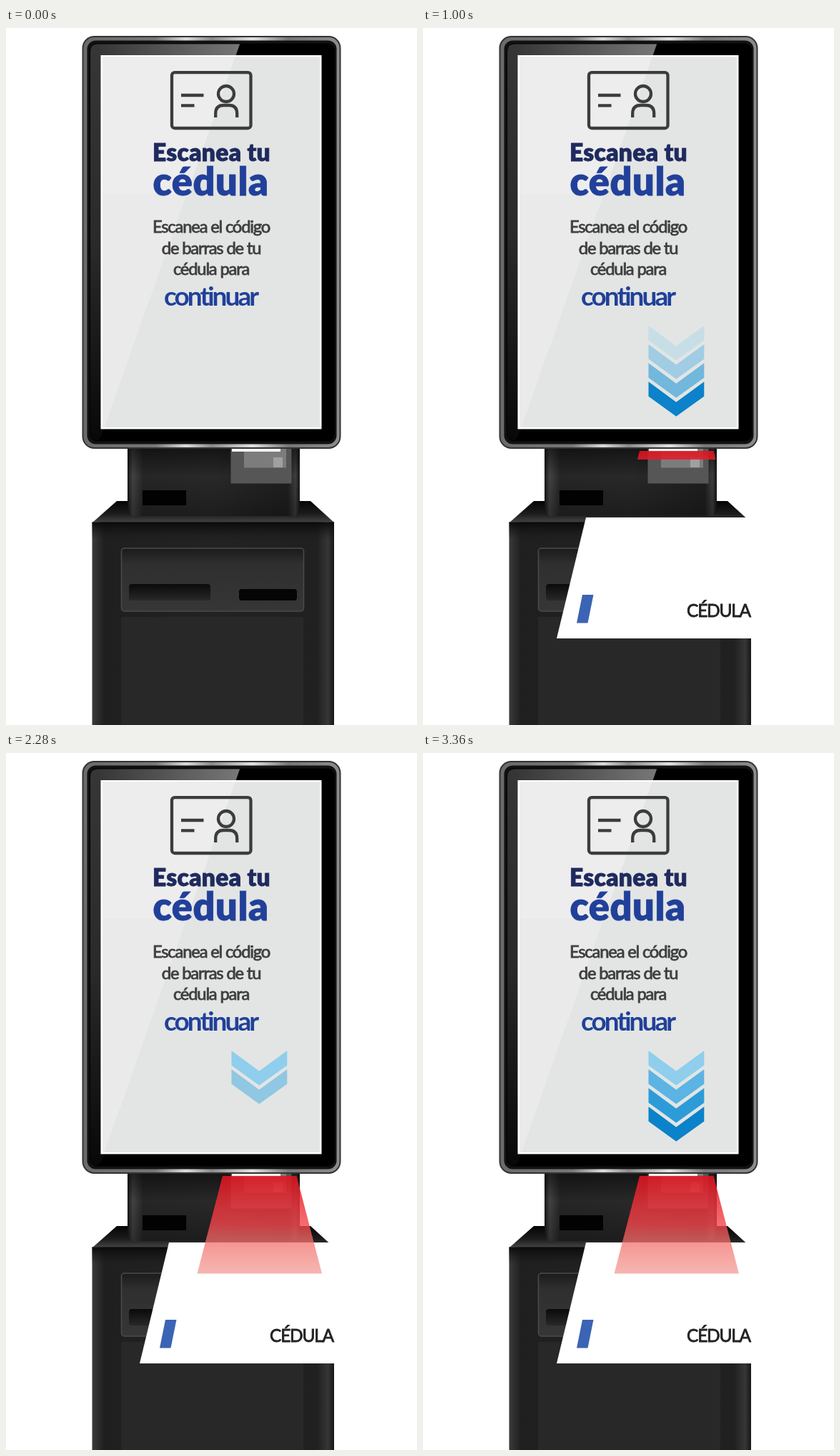
Write an HTML page that moves like this. It is 575x974 px and loops after 3.38 s.

```html
<!DOCTYPE html>
<html lang="es">
<head>
<meta charset="utf-8">
<title>Escanea tu cédula</title>
<style>
  html, body { margin: 0; width: 100%; height: 100%; overflow: hidden; background: #fff; }
  svg { display: block; width: 575px; height: 974px; }
  text { font-family: Lato, "Open Sans", sans-serif; text-anchor: middle; }
  .title { font-weight: 900; letter-spacing: .01em; stroke-width: .8; }
  .navy { fill: #1f2a5e; stroke: #1f2a5e; }
  .blue { fill: #21409a; stroke: #21409a; }
  .narrow { letter-spacing: -.05em; stroke-width: .8; fill: #3e3e3e; stroke: #3e3e3e; }
  .strong { font-weight: 700; letter-spacing: -.08em; stroke-width: 0; }
  .label { fill: #222; stroke: #222; }
  .icon { fill: none; stroke: #3c3c3c; stroke-width: 4.3; }
</style>
</head>
<body>
<svg viewBox="0 0 575 974">
  <defs>
    <linearGradient id="metal" x1="0" y1="0" x2="1" y2="0">
      <stop offset="0" stop-color="#6a6a6a"/>
      <stop offset=".28" stop-color="#777"/>
      <stop offset=".4" stop-color="#dcdcdc"/>
      <stop offset=".5" stop-color="#8a8a8a"/>
      <stop offset=".66" stop-color="#e2e2e2"/>
      <stop offset=".8" stop-color="#777"/>
      <stop offset="1" stop-color="#8c8c8c"/>
    </linearGradient>
    <linearGradient id="shine" x1="0" y1="0" x2="0" y2="1">
      <stop offset="0" stop-color="#363636"/>
      <stop offset=".5" stop-color="#2a2a2a"/>
      <stop offset="1" stop-color="#080808"/>
    </linearGradient>
    <linearGradient id="glint" x1="0" y1="0" x2="1" y2="0">
      <stop offset="0" stop-color="#777" stop-opacity="0"/>
      <stop offset="1" stop-color="#777"/>
    </linearGradient>
    <linearGradient id="neck" x1="0" y1="0" x2="1" y2="0">
      <stop offset="0" stop-color="#1a1a1a"/>
      <stop offset=".03" stop-color="#4a4a4a"/>
      <stop offset=".09" stop-color="#2a2a2a"/>
      <stop offset=".5" stop-color="#2d2d2d"/>
      <stop offset=".93" stop-color="#222"/>
      <stop offset=".975" stop-color="#454545"/>
      <stop offset="1" stop-color="#181818"/>
    </linearGradient>
    <linearGradient id="shade" x1="0" y1="0" x2="0" y2="1">
      <stop offset="0" stop-color="#000" stop-opacity=".75"/>
      <stop offset=".5" stop-color="#000" stop-opacity=".1"/>
      <stop offset="1" stop-color="#000" stop-opacity=".35"/>
    </linearGradient>
    <linearGradient id="deck" x1="0" y1="0" x2="0" y2="1">
      <stop offset="0" stop-color="#050505"/>
      <stop offset=".6" stop-color="#1c1c1c"/>
      <stop offset="1" stop-color="#444"/>
    </linearGradient>
    <linearGradient id="body" x1="0" y1="0" x2="1" y2="0">
      <stop offset="0" stop-color="#3a3a3a"/>
      <stop offset=".05" stop-color="#1f1f1f"/>
      <stop offset=".5" stop-color="#222"/>
      <stop offset=".93" stop-color="#202020"/>
      <stop offset=".975" stop-color="#363636"/>
      <stop offset="1" stop-color="#171717"/>
    </linearGradient>
    <linearGradient id="lip" x1="0" y1="0" x2="0" y2="1">
      <stop offset="0" stop-color="#080808" stop-opacity=".9"/>
      <stop offset="1" stop-color="#181818" stop-opacity="0"/>
    </linearGradient>
    <linearGradient id="panel" x1="0" y1="0" x2="0" y2="1">
      <stop offset="0" stop-color="#1b1b1b"/>
      <stop offset=".25" stop-color="#2f2f2f"/>
      <stop offset="1" stop-color="#363636"/>
    </linearGradient>
    <linearGradient id="slot" x1="0" y1="0" x2="0" y2="1">
      <stop offset="0" stop-color="#0a0a0a"/>
      <stop offset="1" stop-color="#282828"/>
    </linearGradient>
    <linearGradient id="light" x1="0" y1="0" x2="0" y2="1">
      <stop offset="0" stop-color="#e0141f" stop-opacity=".87"/>
      <stop offset=".5" stop-color="#f4474d" stop-opacity=".8"/>
      <stop offset=".68" stop-color="#f3716d" stop-opacity=".75"/>
      <stop offset="1" stop-color="#f0857c" stop-opacity=".6"/>
    </linearGradient>
    <clipPath id="reveal"><rect id="wipe" x="260" y="591" width="190" height="0"/></clipPath>
  </defs>

  <!-- base -->
  <path d="M155 661H426L459 691H121Z" fill="url(#deck)"/>
  <rect x="120.500" y="690" width="338.500" height="284" fill="url(#body)"/>
  <rect x="120.500" y="691" width="338.500" height="24" fill="url(#lip)"/>
  <rect x="161.500" y="727" width="255" height="88" rx="4" fill="url(#panel)" stroke="#4b4b4b" stroke-width="1.500"/>
  <rect x="172" y="777" width="114" height="23" rx="4" fill="url(#slot)"/>
  <rect x="326" y="784" width="81" height="16" rx="4" fill="#050505"/>
  <rect x="161" y="823" width="255" height="155" rx="2" fill="#282828"/>

  <!-- neck -->
  <rect x="170" y="570" width="241" height="112" rx="8" fill="url(#neck)"/>
  <rect x="170" y="570" width="241" height="112" rx="8" fill="url(#shade)"/>
  <rect x="191" y="646" width="61" height="21" fill="#020202"/>
  <rect x="314.500" y="586" width="85" height="50.500" fill="#565656"/>
  <rect x="333" y="586" width="59" height="28.500" fill="#7c7c7c"/>
  <rect x="374" y="600" width="13" height="14" fill="#a0a0a0"/>
  <rect x="316" y="586" width="68" height="6" fill="#f3f5f4"/>

  <!-- display -->
  <rect x="106.500" y="11" width="362" height="577" rx="17" fill="#333"/>
  <rect x="108.500" y="13" width="358" height="573" rx="15" fill="url(#metal)"/>
  <rect x="113.500" y="17.500" width="349" height="564" rx="12" fill="#111"/>
  <rect x="117" y="21.500" width="343" height="556" rx="10" fill="#000"/>
  <path d="M128 22.500H327L133 571L128 576Q118 576 118 566V32.500Q118 22.500 128 22.500Z" fill="url(#shine)"/>
  <path d="M128 22.500H327L321 40H128Z" fill="url(#glint)"/>
  <rect x="132.500" y="38" width="309" height="522.500" fill="#fff"/>
  <rect x="135" y="40.500" width="304" height="517.500" fill="#e2e5e3"/>
  <path d="M135 40.500H320.500L137.700 558H135Z" fill="#e9eae9"/>
  <path d="M135 40.500H320.500L253 232H135Z" fill="#ededee"/>

  <g class="icon">
    <rect x="232" y="62.200" width="110.500" height="77.800" rx="4"/>
    <path d="M245 94H276.500M245 108.300H263.500"/>
    <circle cx="308" cy="92" r="11"/>
    <path d="M293.200 125V119.500Q293.200 108 304.500 108H312Q323.200 108 323.200 119.500V125"/>
  </g>
  <text class="title navy" x="287.500" y="186" font-size="33.500">Escanea tu</text>
  <text class="title blue" x="286.500" y="233.500" font-size="54">cédula</text>
  <g class="narrow" font-size="23.800">
    <text x="287" y="286">Escanea el código</text>
    <text x="287" y="315.500">de barras de tu</text>
    <text x="287" y="345">cédula para</text>
    <text class="strong blue" x="286" y="388" font-size="37">continuar</text>
  </g>
  <g id="arrows"></g>

  <!-- card -->
  <g id="card" opacity="0">
    <path d="M228 684H480V853H187Z" fill="#fff"/>
    <path d="M223 792H238.500L230.500 831.500H215Z" fill="#3c64b4"/>
    <text class="narrow label" x="413.500" y="822.500" font-size="24.500">CÉDULA</text>
  </g>

  <g clip-path="url(#reveal)">
    <path d="M303 591H406.500L442 727.500H267.500Z" fill="url(#light)"/>
  </g>
</svg>
<script>
  const LOOP = 3380, CYCLE = 822, START = 466, STEP = 107;
  const BEAM_START = 420, BEAM_HEIGHT = 137;
  const fadeStart = [430, 455, 475, 555], FADE = 157;
  const colors = ['#8fceed', '#5bb4e4', '#2e9bd9', '#0b82c9'];
  const get = id => document.getElementById(id);
  const ramp = (t, from, length) => Math.min(1, Math.max(0, (t - from) / length));

  const arrows = colors.map((color, i) => {
    const path = document.createElementNS('http://www.w3.org/2000/svg', 'path');
    const y = 416 + 26.1 * i;
    path.setAttribute('d', `M315.500 ${y}l38.700 28.500 39.100-28.500v20.500l-39.100 28-38.700-28z`);
    path.setAttribute('fill', color);
    get('arrows').append(path);
    return path;
  });

  function drawCard(t) {
    const y = 150 * (1 - ramp(t, 80, 320)) ** 3.5;
    get('card').setAttribute('opacity', ramp(t, 80, 220));
    get('card').setAttribute('transform', `translate(${-y / 24} ${y})`);
  }

  function drawArrows(t) {
    const phase = (t - START) % CYCLE;
    arrows.forEach((arrow, i) => {
      const shown = t < START ? 0 : ramp(phase, i * STEP, STEP) - ramp(phase, fadeStart[i], FADE);
      arrow.setAttribute('opacity', shown);
    });
  }

  // The beam closes as the arrows fade and reopens before the next run.
  function beam(t) {
    if (t < START + 200) return ramp(t, BEAM_START, 175);
    const phase = (t - START) % CYCLE;
    return 1 - ramp(phase, 430, 115) + ramp(phase, 568, 175);
  }

  function frame(now) {
    const t = now % LOOP;
    drawCard(t);
    drawArrows(t);
    get('wipe').setAttribute('height', BEAM_HEIGHT * beam(t));
    requestAnimationFrame(frame);
  }
  requestAnimationFrame(frame);
</script>
</body>
</html>
```
